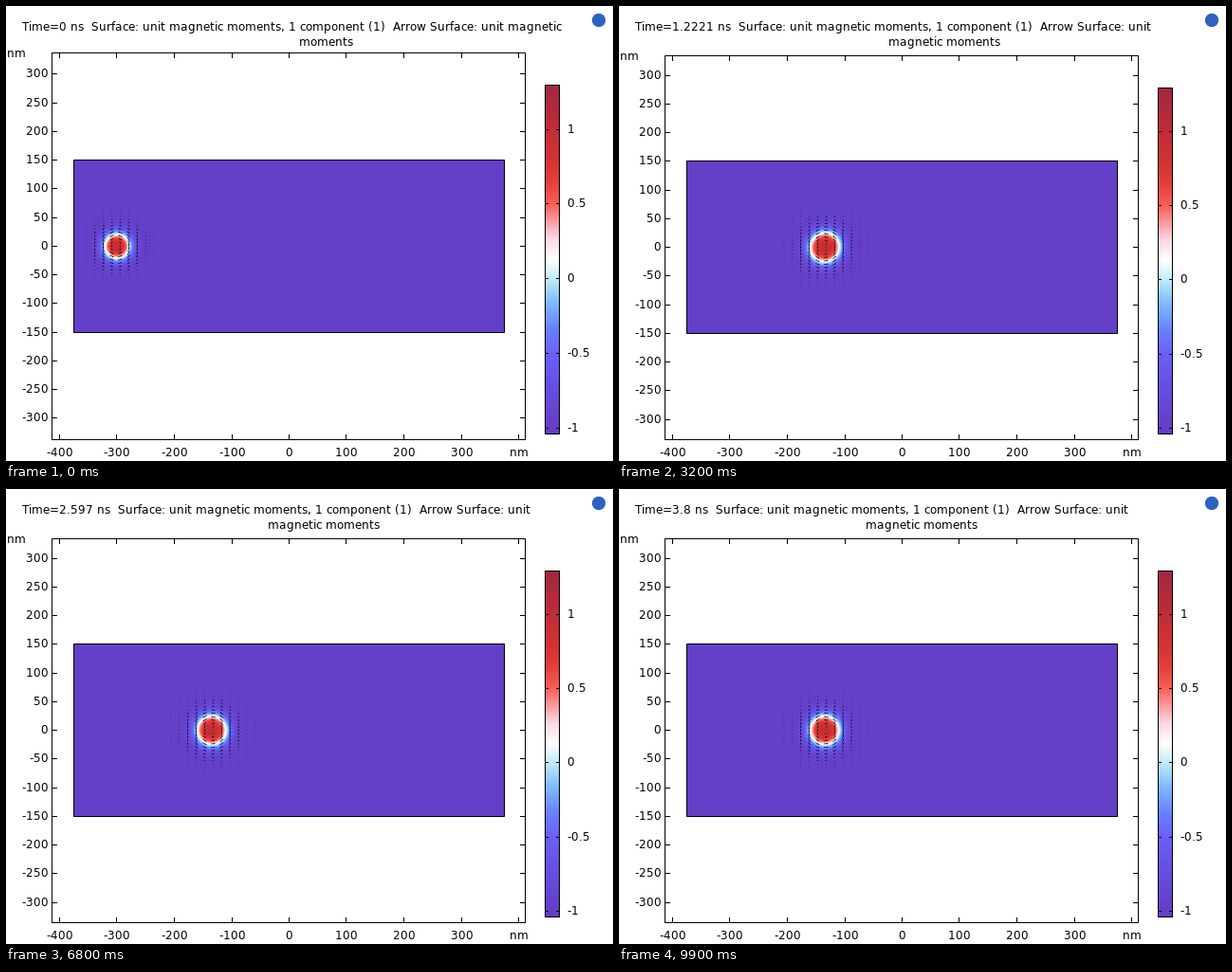
A matplotlib script that plays this animation: 640 px wide and 480 px high, repeating every 10 s.

```python
from functools import lru_cache

import numpy as np
import matplotlib.pyplot as plt
from matplotlib.animation import FuncAnimation
from matplotlib.colors import LinearSegmentedColormap
from matplotlib.patches import Circle, Rectangle

plt.rcParams.update({"font.family": "DejaVu Sans", "font.size": 10.8})

W, H, DPI = 640, 480, 80
FRAMES, INTERVAL = 100, 100
SCALE = 0.605                      # px per nm
X0 = 298                           # px of x = 0 nm
LEFT, RIGHT, BOTTOM = 48, 547, 457
BAR_L, BAR_R, BAR_B = 568, 583, 451
VMIN, VMAX = -1.04, 1.296
PULSE = 0.975                      # ns
SPEED = 172                        # nm per ns

STOPS = [
    (-1.04, (100, 63, 197)), (-0.95, (101, 65, 202)), (-0.72, (102, 80, 226)),
    (-0.50, (108, 96, 249)), (-0.34, (104, 128, 255)), (-0.15, (130, 190, 255)),
    (0.00, (190, 235, 250)), (0.13, (255, 255, 255)), (0.27, (252, 215, 228)),
    (0.50, (247, 96, 88)), (0.65, (228, 62, 58)), (0.80, (210, 52, 52)),
    (1.00, (193, 45, 55)), (1.296, (160, 40, 64)),
]
cmap = LinearSegmentedColormap.from_list(
    "wave", [((v - VMIN) / (VMAX - VMIN), np.array(c) / 255) for v, c in STOPS])

fig = plt.figure(figsize=(W / DPI, H / DPI), dpi=DPI, facecolor="white")
ax = fig.add_axes([0, 0, 1, 1])
ax.set_xlim(0, W)
ax.set_ylim(H, 0)
ax.axis("off")
ax.set_autoscale_on(False)


def line(x, y):
    return ax.plot(x, y, color="black", lw=0.9, snap=True, zorder=5)


def box(x0, y0, x1, y1):
    return [ax.add_patch(Rectangle((x0, y0), x1 - x0, y1 - y0, fill=False,
                                   ec="black", lw=0.9, snap=True, zorder=5))]


def image(data, extent, zorder=1):
    return ax.imshow(data, extent=extent, cmap=cmap, vmin=VMIN, vmax=VMAX,
                     interpolation="nearest", aspect="auto", zorder=zorder)


@lru_cache(maxsize=None)
def advance(char):
    probe = ax.text(0, 0, char)
    width = probe.get_window_extent().width
    probe.remove()
    return round(width)


def text_width(s):
    return sum(map(advance, s))


def label(x, y, s, align=0.0):
    """Text set on whole-pixel advances; align 0, 0.5, 1 = left, centre, right."""
    x = int(x - align * text_width(s))
    glyphs = []
    for char in s:
        if char != " ":
            # the trailing space keeps the bitmap origin at the pen position
            glyphs.append(ax.text(x, y, char + " ", va="baseline", zorder=6))
        x += advance(char)
    return glyphs


def backdrop(top, cy, bar_top):
    """Draw axes, sample outline and colour bar once; return them as an image."""
    art = box(LEFT, top, RIGHT, BOTTOM) + label(1, top + 5, "nm")
    art += box(X0 - 375 * SCALE, cy - 150 * SCALE, X0 + 375 * SCALE, cy + 150 * SCALE)
    for v in range(-400, 401, 100):
        x = round(X0 + v * SCALE)
        art += line([x, x], [BOTTOM, BOTTOM - 5]) + line([x, x], [top, top + 5])
        art += label(x + 1, 475, "nm" if v == 400 else str(v), 0.5)
    for v in range(-300, 301, 50):
        y = np.floor(cy - v * SCALE + 0.5)
        art += line([LEFT, LEFT + 5], [y, y]) + line([RIGHT - 5, RIGHT], [y, y])
        art += label(45, y + 4, str(v), 1)

    ramp = np.linspace(VMAX, VMIN, 368)[:, None]
    art += [image(ramp, (BAR_L, BAR_R + 1, BAR_B + 1, bar_top))]
    art += box(BAR_L, bar_top, BAR_R, BAR_B)
    for v in (-1, -0.5, 0, 0.5, 1):
        y = round(BAR_B - (v - VMIN) / (VMAX - VMIN) * (BAR_B - bar_top))
        art += line([BAR_L, BAR_L + 3], [y, y]) + line([BAR_R - 3, BAR_R], [y, y])
        art += label(592, y + 4, f"{v:g}")

    fig.canvas.draw()
    shot = np.array(fig.canvas.buffer_rgba())
    for a in art:
        a.remove()
    return shot


ax.add_patch(Circle((625, 15), 7, fc="#2f62c0", ec="none"))

CENTER = {True: 252.8, False: 254}
BACK = {True: backdrop(49, CENTER[True], 83),
        False: backdrop(52, CENTER[False], 86)}
back = image(BACK[True], (0, W, H, 0), zorder=0)

TITLE = "Surface: unit magnetic moments, 1 component (1)  Arrow Surface: unit"
WRAP = {True: (TITLE + " magnetic", "moments"),
        False: (TITLE, "magnetic moments")}
heading = []

# Pixel and arrow grids over the sample, in px from its centre
px, py = np.meshgrid(np.arange(453) - 226, np.arange(181) - 90)
N = 51
gx, gy = np.meshgrid((np.arange(N) + 0.5) * 454 / N - 227,
                     (np.arange(N) + 0.5) * 182 / N - 91)
surface = image(np.full(px.shape, -1.0), (72, 525, 345, 164))
arrows = ax.quiver(gx, gy, gx * 0, gy * 0, angles="xy", scale_units="xy",
                   scale=1, units="xy", pivot="mid", width=0.65, headwidth=2.4,
                   headlength=2.5, headaxislength=2.2, minlength=0.9,
                   color="black", zorder=4)


def spin(x, y, t):
    """Polar angle of the moments and the direction from the core."""
    cx = (-300 + SPEED * min(t, PULSE)) * SCALE
    after = max(t - PULSE, 0)
    cx -= 1.5 * (1 - np.exp(-after / 0.1))
    radius = 16 - 2.5 * np.exp(-t / 0.15)
    wall = 8.5 - 0.5 * np.exp(-t / 0.15)

    # The core stretches while driven, then the stretch turns and dies away
    amp = 0.07 * (1 - np.exp(-t / 0.2)) * np.exp(-after / 0.35)
    tilt = np.pi / 2 - after * 3.2
    dx, dy = x - cx, y
    along = (dx * np.cos(tilt) - dy * np.sin(tilt)) / (1 + amp)
    across = dx * np.sin(tilt) + dy * np.cos(tilt)
    r = np.hypot(along, across) + 1e-6
    theta = 2 * np.arctan(np.sinh(radius / wall) / np.sinh(r / wall))
    return theta, np.arctan2(dy, dx)


def update(i):
    t = 3.8 * (i * 199 // 99) / 199
    start = i == 0
    cy = CENTER[start]
    back.set_data(BACK[start])

    while heading:
        heading.pop().remove()
    time = f"Time={t:.5g} ns  "
    line1, line2 = WRAP[start]
    middle = 17 + text_width(time) + text_width(line1) / 2
    heading.extend(label(17, 26, time + line1) + label(middle, 42, line2, 0.5))

    theta, _ = spin(px, py, t)
    surface.set_data(-np.cos(theta))
    top = np.floor(cy - 150 * SCALE + 0.5) + 1
    surface.set_extent((72, 525, top + 181, top))

    theta, phi = spin(gx, gy, t)
    size = 5 * np.ma.masked_less(np.sin(theta), 0.05)
    arrows.set_offsets(np.column_stack([(gx + X0 + 0.5).ravel(),
                                        (gy + cy + 0.5).ravel()]))
    arrows.XY = arrows.get_offsets()
    arrows.set_UVC(size * np.sin(phi), -size * np.cos(phi))
    return []


anim = FuncAnimation(fig, update, frames=FRAMES, interval=INTERVAL,
                     init_func=lambda: [], repeat=True, repeat_delay=0)
plt.show()
```
